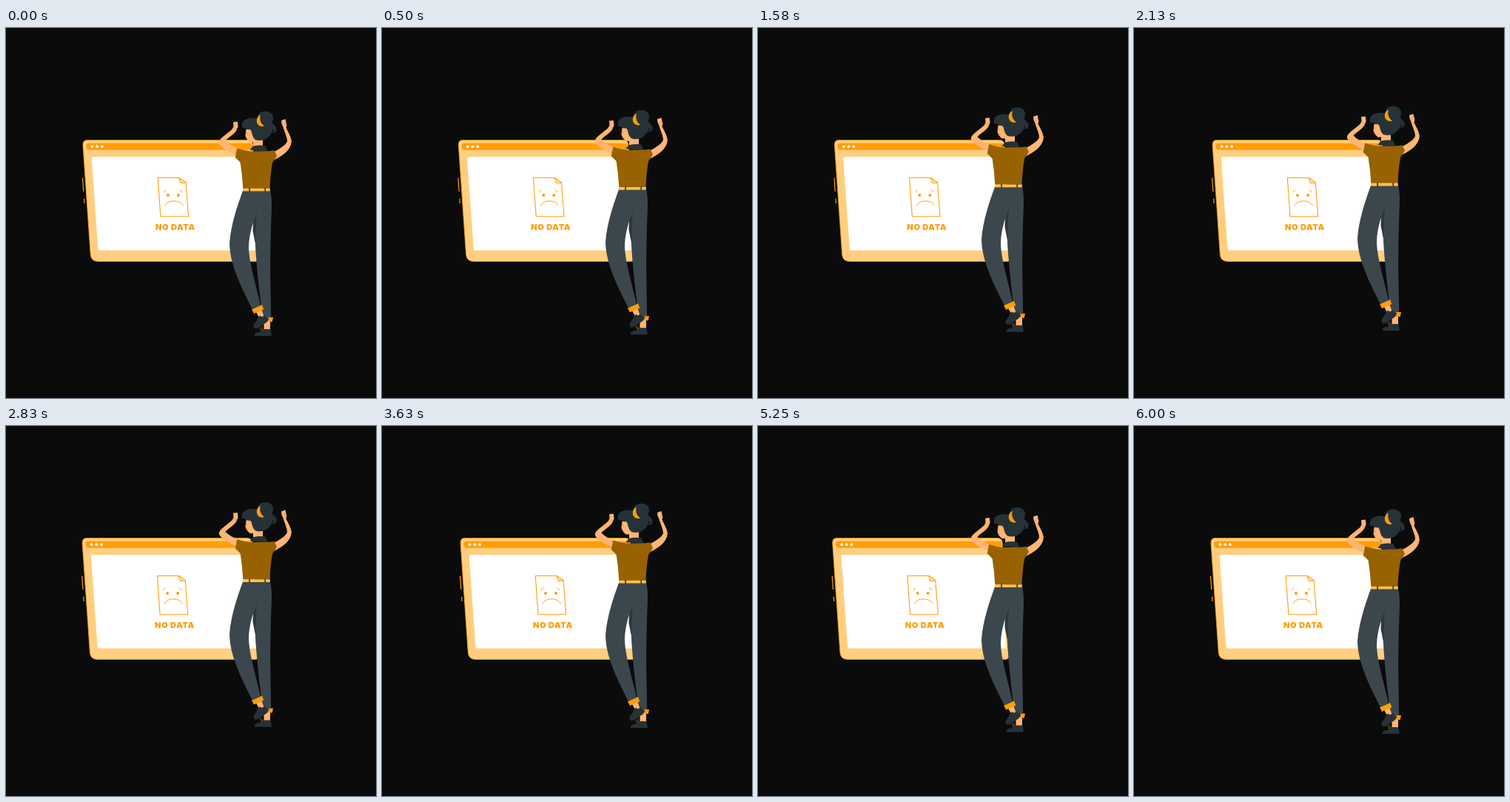
Recreate the animation shown at these times as an HTML page. Size 500 by 500 pixels, loop 6040 ms.

```html
<!DOCTYPE html>
<html lang="en">
<head>
<meta charset="utf-8">
<title>No data</title>
<style>
  html, body { margin: 0; width: 100%; height: 100%; overflow: hidden; background: #0b0b0b; }
  svg { display: block; width: 100vw; height: 100vh; }
  .hair { fill: #263238; }
  .skin { fill: #ffb573; }
  .orange { fill: #ff9d0a; }
  .pants { fill: #3c474d; }
  .line { fill: none; stroke: #ff9d0a; stroke-linecap: round; stroke-linejoin: round; }
  text { font: 900 11px Inter, "Open Sans", sans-serif; letter-spacing: .6px; fill: #ff9d0a; }
</style>
</head>
<body>
<svg viewBox="0 0 500 500">
  <g id="window">
    <path class="line" stroke-width="1.2" d="M103.600 203L104.800 220.500M105.600 231L106 236.500"/>
    <path fill="#ffce80" stroke="#ff9d0a" stroke-width=".8" d="M109.500 151.600H327Q333 151.600 333.600 158L343 308Q343 315.400 337 315.400H124.500Q115 315.400 114.300 306L104.100 158.500Q103.700 151.600 109.500 151.600Z"/>
    <path class="orange" d="M112.300 155.700H329Q333 155.700 333 160.200T329 164.700H113Q108.600 164.700 108.300 160.200T112.300 155.700Z"/>
    <g fill="#fff">
      <circle cx="116.500" cy="160.200" r="1.900"/>
      <circle cx="123.200" cy="160.200" r="1.900"/>
      <circle cx="129.900" cy="160.200" r="1.900"/>
      <path d="M118.500 174H331L339 300.500H127.500Q124.800 300.500 124.500 297.500L115.800 177Q115.600 174 118.500 174Z"/>
    </g>
    <path class="line" stroke-width="1.100" d="M205.300 202.500H234L243.200 209L246.700 254.700H209Z"/>
    <path class="line" style="fill:#ffe0b2" stroke-width="1" d="M234 202.500L236.200 209.700L243.200 209Z"/>
    <path class="line" stroke-width="1" d="M213.200 221.700Q214 219.700 216 218.900M234.800 218.900Q237 219.700 237.800 221.700M215 239.800C218 231.700 236 231.700 239.300 239.800"/>
    <circle class="orange" cx="219" cy="226" r="2"/>
    <circle class="orange" cx="233" cy="226" r="2"/>
    <text x="202" y="273.200">NO DATA</text>
  </g>

  <g id="woman">
    <!-- legs -->
    <path class="skin" d="M348.500 395H357V409H348.500Z"/>
    <path class="hair" d="M336 416V413.500Q338 411 343 410.500L348 407H357.700L358.800 416Z"/>
    <path class="orange" d="M347 391H361L359.700 397H347Z"/>
    <path class="pants" d="M333 220H357.300Q359.500 232 358.900 246C358 270 356.800 310 357.300 340L358.200 391H347C344 370 338 320 336.800 290L333 255Z"/>
    <path fill="#2d383e" d="M339 245L334 262L333.500 274L336.800 291Q338 268 339 245Z"/>
    <path class="skin" d="M337.500 383L345 379.500L348.500 389.500L342.500 392Z"/>
    <path class="hair" d="M334 402.500L341 391L343 388.500Q347 392 348.500 388L355.300 392.500Q354 397 349.500 399.500C345 402 343 406 336.500 406.300Z"/>
    <path class="line" stroke-width=".7" d="M343 406.500L346 404.800M344.500 408.500L347 407"/>
    <path class="orange" d="M332 380L346 374L348.300 380.200L335 386Z"/>
    <path class="pants" d="M320 220H343L340 245C336 258 328.500 275 328 296C328.300 317 338 348 344 374.500L333 380C316 347 302.500 318 302 291C304 265 312.500 241 320 220Z"/>

    <!-- arms -->
    <path class="skin" d="M307 127.200L312.800 126.500L313.600 133L311.300 138.500C308 144 300 148 296.500 152.500Q303 159 315 163.500L311 172C303 168 288.500 161 287.800 154.500C287.800 149 300 142.500 305.800 136.500L307.500 133Z"/>
    <path class="skin" d="M372 125L377.500 123L379.300 131L378.500 135C381 140 386 148 385.800 154C384.500 165 375 172 362 178.500L362.500 167C371 163 379 157 380 153C380 147 376 140 374.600 134L372.500 129.500Z"/>
    <path fill="none" stroke="#d98a50" stroke-width=".6" d="M308 134.500L311 136M374 130.500L378 129"/>

    <!-- shirt -->
    <path class="skin" d="M324.500 137L323.500 146L326 151L329.500 154.500L334 154.500V164H347V146L340 134Z"/>
    <path class="hair" d="M329.500 165L333.500 159.800Q342 157.800 350 159L354 167Z"/>
    <path fill="#986200" d="M312.200 162.500Q322 165.800 330 166.500H353L362.500 165.500L366 172.500Q363 178.500 360.200 181.500Q357.300 196 356.500 217H320.300Q319.500 200 316.600 181.500L309.800 175Z"/>
    <path fill="none" stroke="#7b4f00" stroke-width=".6" d="M316.600 181.500L315.500 174M360.200 181.500L361 176"/>
    <path fill="#ffc04f" d="M320.300 216.700H356.800V220.500H320.300Z"/>
    <path class="hair" d="M328.300 216H329.900V221H328.300ZM349.500 216H351V221H349.500Z"/>

    <!-- head -->
    <path class="hair" d="M319 134.800Q318 126 323.500 123.500Q332 120 341 122.500C338 114 348 111.500 354 113C361 115 362.500 121 359.800 127C361 132 366 132 365.800 137.500Q364.500 142.500 359.300 141.500Q362.500 140 360.500 136Q360 142 356.800 145Q351 151 346.500 151.500Q342 152.500 337 151Q333.500 148 332.500 143Q332 138.500 329.500 137Q325 138 322.500 134.800Z"/>
    <path class="orange" d="M344 117.500C338 119 337.500 128 341 131Q344 134 349 132.500C344 129 342 123 344 117.500Z"/>
    <path fill="none" stroke="#d9723f" stroke-width=".7" d="M324 149L326.500 148.800M325.500 141.500L326.500 143.500"/>
  </g>
</svg>
<script>
  const LOOP = 6040, FPS = 24;
  const windowGroup = document.getElementById('window');
  const womanGroup = document.getElementById('woman');
  // Horizontal shake offsets at each tenth of its 1.5 s cycle
  const SHAKE = [0, -1, 2, -4, 4, -4, 4, -4, 2, -1, 0];

  function shake(ms) {
    const pos = (ms % 1500) / 150;
    const i = Math.floor(pos);
    return SHAKE[i] + (SHAKE[i + 1] - SHAKE[i]) * (pos - i);
  }

  // Steady rise of 10 px and return over 6 s
  function float(ms) {
    const p = (ms % 6000) / 3000;
    return -10 * (p < 1 ? p : 2 - p);
  }

  function draw(time) {
    const step = Math.floor(((time % LOOP) + 5) * FPS / 1000);
    const ms = step % (6 * FPS) * 1000 / FPS;
    windowGroup.setAttribute('transform', `translate(${shake(ms + 12)} 0)`);
    womanGroup.setAttribute('transform', `translate(0 ${float(ms)})`);
  }

  const start = performance.now();
  function tick() {
    draw(performance.now() - start);
    requestAnimationFrame(tick);
  }
  tick();
</script>
</body>
</html>
```
